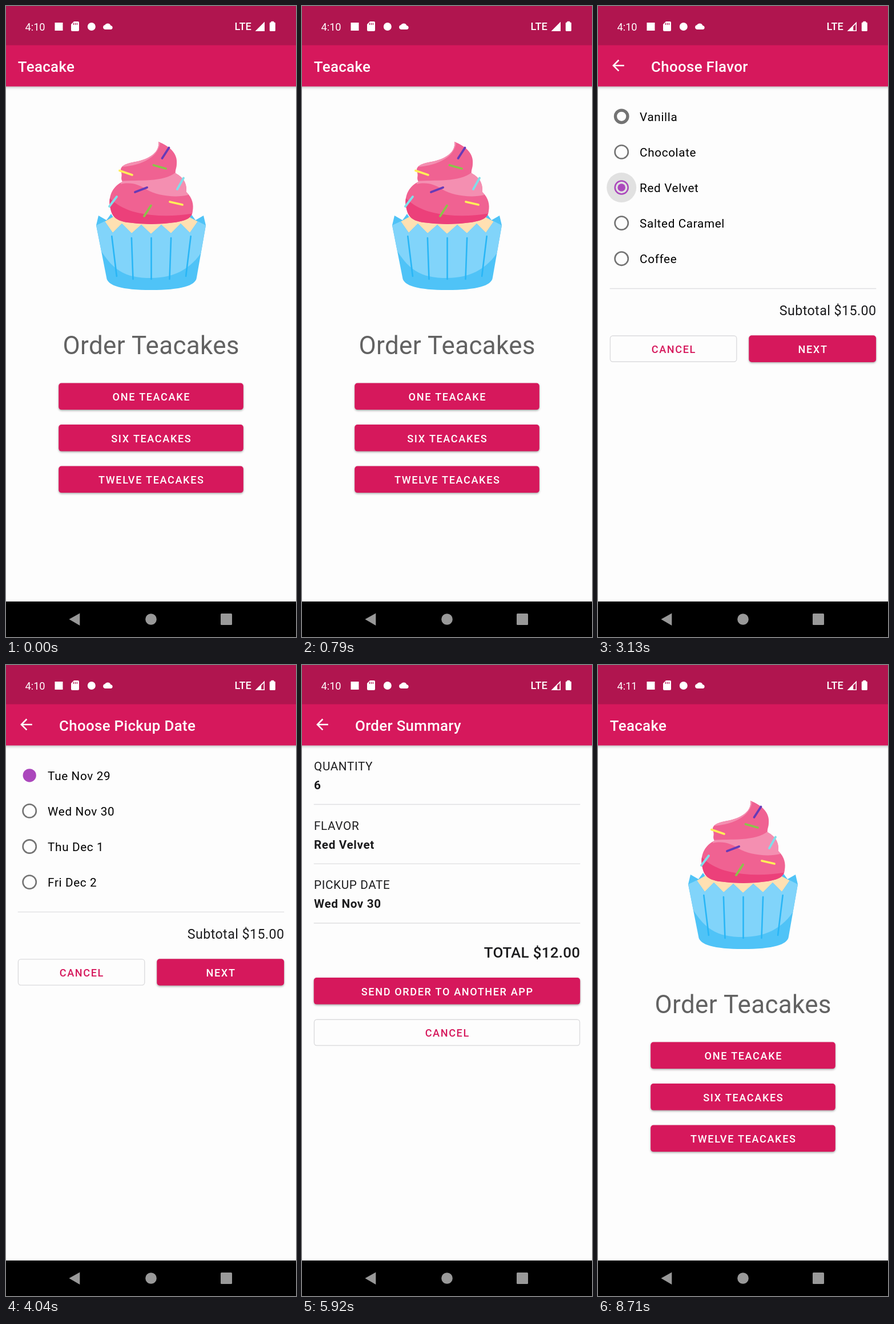
These frames come from a looping animation (508 by 1102 pixels, 8.75 s). An HTML page with a canvas:

```html
<!DOCTYPE html>
<html lang="en">
<head>
<meta charset="utf-8">
<title>Teacake order</title>
<style>
html, body { margin: 0; width: 100%; height: 100%; overflow: hidden; background: #fdfdfd; }
canvas { display: block; width: 100vw; height: 100vh; }
</style>
</head>
<body>
<canvas id="stage" width="508" height="1102"></canvas>
<script>
const ctx = document.getElementById('stage').getContext('2d');
const LOOP = 8750, W = 508, DP = 508 / 392.73, MARGIN = 20.7;
const PINK = '#d6185c', PURPLE = '#ab47bc', GREY = '#737373', INK = '#1b1b1d', PAPER = '#fdfdfd';

// Times in ms
const FLAVOR = 1320, DATE = 3870, SUMMARY = 5750, HOME = 7850;
const PICK_FLAVOR = 2760, PICK_DATE = 5030, MINUTE = 7300, SIGNAL = 1000;

const clamp = v => Math.max(0, Math.min(1, v));
const mix = (a, b, p) => a + (b - a) * p;

// cubic-bezier(.4, 0, .2, 1)
function ease(x) {
  x = clamp(x);
  let lo = 0, hi = 1;
  for (let i = 0; i < 18; i++) {
    const s = (lo + hi) / 2, r = 1 - s;
    if (1.2 * r * r * s + 0.6 * r * s * s + s * s * s < x) lo = s; else hi = s;
  }
  return 3 * (1 - lo) * lo * lo + lo ** 3;
}

function text(str, x, y, size, { weight = 400, color = INK, align = 'left', track = 0 } = {}) {
  ctx.font = `${weight} ${size}px Roboto, sans-serif`;
  ctx.letterSpacing = `${track * size}px`;
  ctx.textAlign = align;
  ctx.fillStyle = color;
  const shift = { left: 0, center: 0.5, right: 0.5 }[align];
  ctx.fillText(str, x + shift * track * size, y);
}

function shape(d, fill) {
  ctx.fillStyle = fill;
  ctx.fill(new Path2D(d));
}

function line(x1, y1, x2, y2, width, color, cap = 'butt') {
  ctx.lineWidth = width;
  ctx.lineCap = cap;
  ctx.strokeStyle = color;
  ctx.beginPath();
  ctx.moveTo(x1, y1);
  ctx.lineTo(x2, y2);
  ctx.stroke();
}

function disc(x, y, r, color) {
  ctx.fillStyle = color;
  ctx.beginPath();
  ctx.arc(x, y, Math.max(0, r), 0, Math.PI * 2);
  ctx.fill();
}

function box(x, y, w, h, r, color) {
  ctx.fillStyle = color;
  ctx.beginPath();
  ctx.roundRect(x, y, w, h, r);
  ctx.fill();
}

const divider = y => line(MARGIN, y, W - MARGIN, y, 1.4, '#dfdfe1');

// press: ms since the finger went down, negative when untouched
function button(label, x, y, w, { outlined = false, press = -1 } = {}) {
  const h = 46.6;
  ctx.save();
  if (!outlined) {
    ctx.shadowColor = 'rgba(0,0,0,.34)';
    ctx.shadowBlur = 3.5;
    ctx.shadowOffsetY = 1.6;
  }
  box(x, y, w, h, 5, outlined ? PAPER : PINK);
  ctx.restore();
  if (outlined) {
    ctx.strokeStyle = '#dcdcde';
    ctx.lineWidth = 1.4;
    ctx.beginPath();
    ctx.roundRect(x + 0.7, y + 0.7, w - 1.4, h - 1.4, 4.5);
    ctx.stroke();
  }
  if (press >= 0) {
    ctx.save();
    ctx.beginPath();
    ctx.roundRect(x, y, w, h, 5);
    ctx.clip();
    disc(x + w / 2, y + h / 2, mix(20, w * 0.55, ease(press / 225)),
      outlined ? 'rgba(214,24,92,.12)' : 'rgba(255,255,255,.22)');
    ctx.restore();
  }
  text(label, x + w / 2, y + 30.6, 14 * DP,
    { weight: 500, color: outlined ? PINK : '#fff', align: 'center', track: 0.0893 });
}

// since: ms since the state last changed
function radio(y, on, since) {
  let scale = 1, stroke = 2, dot = 0;
  if (on) {
    if (since < 183) {
      const p = ease(since / 166);
      scale = mix(1, 0.5, p);
      stroke = mix(2, 18, p);
    } else {
      const p = ease((since - 183) / 317);
      scale = mix(0.9, 1, p);
      dot = mix(1.4, 1, p);
    }
  } else if (since < 183) {
    const p = ease(since / 183);
    scale = mix(1, 0.9, p);
    dot = mix(1, 1.4, p);
  } else {
    const p = ease((since - 183) / 333);
    scale = mix(0.5, 1, p);
    stroke = mix(18, 2, p);
  }
  const color = on ? PURPLE : GREY;
  ctx.strokeStyle = color;
  ctx.lineWidth = stroke * scale * DP;
  ctx.beginPath();
  ctx.arc(41.2, y, 9 * scale * DP, 0, Math.PI * 2);
  ctx.stroke();
  if (dot) disc(41.2, y, 5 * dot * DP, color);
}

function ripple(y, since) {
  if (since < 0) return;
  const alpha = 0.11 * clamp(since / 60) * (1 - clamp((since - 460) / 240));
  disc(41.2, y, 26 * ease(since / 225), `rgba(0,0,0,${alpha})`);
}

function choices(t, { items, shown, picked, pickTime, price, press }) {
  items.forEach((label, i) => {
    const y = 192.8 + i * 62.1, chosen = t >= pickTime;
    if (i === picked) ripple(y, t - pickTime + 70);
    if (i === 0) radio(y, !chosen, t - (chosen ? pickTime : shown));
    else radio(y, chosen && i === picked, chosen && i === picked ? t - pickTime : 1e4);
    text(label, 73.1, y + 8.2, 16 * DP, { color: '#000', track: 0.03125 });
  });
  const y = 183 + items.length * 62.1;
  divider(y);
  text('Subtotal ' + price, 487.2, y + 46.6, 18 * DP, { align: 'right', track: 0.0175 });
  button('CANCEL', MARGIN, y + 81.8, 222.8, { outlined: true });
  button('NEXT', 264.3, y + 81.8, 222.8, { press });
}

function cake() {
  const cup = 'M158 383L173 376 187 396 203 380 220 397 237 382 254 398 272 382 289 397 306 380 322 396 336 376 350 383 334 474Q332 496 254 496 178 496 176 474Z';
  shape('M158 383L162 366 176 374 184 363 194 378 180 386ZM350 383L346 366 332 374 324 363 314 378 328 386Z', '#4fc3f7');
  shape('M172 377L190 367H318L337 377 324 400H185Z', '#ffe0b2');
  const frosting = 'M267 237C289 246 301 259 299 276C299 283 296 287 297 292C310 299 317 308 316 325C327 335 329 348 327 358C326 370 316 375 295 378Q255 384 213 378C193 375 186 368 183 354C177 330 190 313 204 307C200 300 204 298 202 291C197 279 211 275 227 272C248 268 270 257 267 237Z';
  ctx.save();
  ctx.clip(new Path2D(frosting));
  shape('M170 230H340V390H170Z', '#f06292');
  shape('M170 322C190 350 217 361 255 365Q295 369 340 360V390H170Z', '#ec407a');
  shape('M198 281C220 281 264 272 270 240L262 230 195 270Z', '#f48fb1');
  shape('M201 306C231 303 276 309 298 290L322 315 319 330C295 336 262 330 247 321C233 312 220 307 201 311Z', '#f48fb1');
  ctx.restore();
  shape(cup, '#4fc3f7');
  ctx.save();
  ctx.clip(new Path2D(cup));
  shape('M150 360H358V400C338 451 304 475 254 475S180 460 150 396Z', '#81d4fa');
  ctx.restore();
  for (const k of [-2, -1, 0, 1, 2]) {
    const far = Math.abs(k) === 2;
    line(254.5 + k * 34.6, far ? 402 : 405, 254.5 + k * (far ? 30.3 : 32), far ? 472 : 477, 2.6, '#29b6f6', 'round');
  }
  const sprinkles = {
    '#673ab7': [[273.5, 266, 285.5, 247.5], [226, 325, 247, 317]],
    '#8bc34a': [[258.5, 278, 280, 284], [242, 367, 254, 348.5]],
    '#ffee58': [[199, 287.5, 221, 295], [287, 342, 309, 347]],
    '#80deea': [[300, 320, 311, 300.5], [181, 350, 194, 333]]
  };
  for (const [color, list] of Object.entries(sprinkles))
    for (const s of list) line(...s, 3.8, color, 'round');
}

function home(press) {
  cake();
  text('Order Teacakes', W / 2, 608, 34 * DP, { color: '#626262', align: 'center', track: 0.00735 });
  ['ONE TEACAKE', 'SIX TEACAKES', 'TWELVE TEACAKES'].forEach((label, i) =>
    button(label, 92.2, 658.5 + i * 72.5, 323.6, { press: i === 1 ? press : -1 }));
}

function summary(press) {
  [['QUANTITY', '6'], ['FLAVOR', 'Red Velvet'], ['PICKUP DATE', 'Wed Nov 30']].forEach(([label, value], i) => {
    const y = i * 103.6;
    text(label, 21, y + 184, 16 * DP, { track: 0.03125 });
    text(value, 21, y + 217, 16 * DP, { weight: 700, track: 0.03125 });
    divider(y + 243.5);
  });
  text('TOTAL $12.00', 487.2, 511, 20 * DP, { weight: 500, align: 'right', track: 0.0125 });
  button('SEND ORDER TO ANOTHER APP', MARGIN, 546, 466.5);
  button('CANCEL', MARGIN, 618.6, 466.5, { outlined: true, press });
}

function bars(title, back, t) {
  const top = '#b0154f';
  ctx.save();
  ctx.shadowColor = 'rgba(0,0,0,.28)';
  ctx.shadowBlur = 5;
  ctx.shadowOffsetY = 1;
  box(-10, 0, W + 20, 140.5, 0, PINK);
  ctx.restore();
  box(0, 0, W, 68.5, 0, top);

  text(t < MINUTE ? '4:10' : '4:11', 33.5, 42.6, 18.2, { color: '#fff' });
  box(85.5, 29, 14, 14, 0, '#fff');
  shape('M119 27H126Q128 27 128 29V42Q128 44 126 44H116Q114 44 114 42V32Z', '#fff');
  for (const x of [118.4, 121.4, 124.4]) line(x, 29.5, x, 33, 1.3, top);
  disc(149.8, 36, 7, '#fff');
  shape('M173.5 41A4 4 0 0 1 173 33.2A6 6 0 0 1 183.5 34.3A3.4 3.4 0 0 1 184 41Z', '#fff');
  text('LTE', 400.5, 42, 18.2, { color: '#fff', weight: 500 });
  shape('M453 27.5V44H436.5Z', '#fff');
  if (t >= SIGNAL) shape('M451.4 31.5V42.4H447.2V35.7Z', top);
  box(461.8, 28.5, 10, 15.5, 1.5, '#fff');
  box(464.5, 26.8, 4.6, 3, 0.5, '#fff');

  if (back) {
    ctx.save();
    ctx.translate(19.9, 88.4);
    ctx.scale(DP, DP);
    shape('M20 11H7.83l5.59-5.59L12 4l-8 8 8 8 1.41-1.41L7.83 13H20z', '#fff');
    ctx.restore();
  }
  text(title, back ? 93 : 20.8, 115, 20 * DP, { weight: 500, color: '#fff', track: 0.0125 });

  box(0, 1040, W, 62, 0, '#000');
  shape('M110.5 1071L129.3 1060.5V1082Z', '#999');
  disc(254, 1071, 9.8, '#999');
  box(376, 1061, 20, 20, 1.5, '#999');
}

function draw(t) {
  ctx.fillStyle = PAPER;
  ctx.fillRect(0, 0, W, 1102);
  const pressBefore = end => t - (end - 160);
  let title = 'Teacake', back = true;
  if (t < FLAVOR || t >= HOME) {
    back = false;
    home(t < FLAVOR ? pressBefore(FLAVOR) : -1);
  } else if (t < DATE) {
    title = 'Choose Flavor';
    choices(t, {
      items: ['Vanilla', 'Chocolate', 'Red Velvet', 'Salted Caramel', 'Coffee'],
      shown: FLAVOR, picked: 2, pickTime: PICK_FLAVOR, price: '$15.00', press: pressBefore(DATE)
    });
  } else if (t < SUMMARY) {
    title = 'Choose Pickup Date';
    choices(t, {
      items: ['Tue Nov 29', 'Wed Nov 30', 'Thu Dec 1', 'Fri Dec 2'],
      shown: DATE, picked: 1, pickTime: PICK_DATE,
      price: t < PICK_DATE ? '$15.00' : '$12.00', press: pressBefore(SUMMARY)
    });
  } else {
    title = 'Order Summary';
    summary(pressBefore(HOME));
  }
  bars(title, back, t);
}

const start = performance.now();
function tick() {
  draw((performance.now() - start) % LOOP);
  requestAnimationFrame(tick);
}
tick();
</script>
</body>
</html>
```
